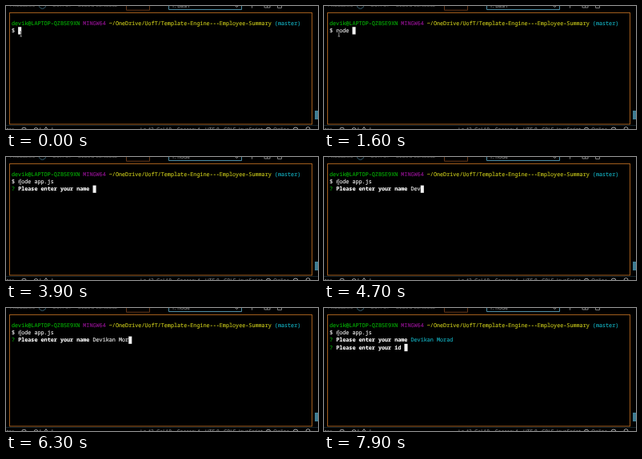
Recreate the animation shown at these times as an HTML page. Size 390 by 154 pixels, loop 8000 ms.

```html
<!DOCTYPE html>
<html lang="en">
<head>
<meta charset="utf-8">
<title>Terminal session</title>
<style>
html, body { margin: 0; width: 100%; height: 100%; overflow: hidden; background: #000; }
svg { display: block; width: 390px; height: 154px; background: #000; }
text { white-space: pre; text-rendering: geometricPrecision; }
.term { font: 6.77px "Noto Sans Mono", "DejaVu Sans Mono", monospace; color: #f0f0f0; }
.term text, .term tspan { fill: currentColor; stroke: currentColor; stroke-width: .14; }
.ui { font: 6.6px "Open Sans", "Noto Sans", sans-serif; fill: #a8a8a8; }
.line { fill: none; stroke-width: 1; }
.green { color: #06ae06; }
.magenta { color: #8e128e; }
.yellow { color: #c4c41a; }
.cyan { color: #14aebe; }
.bold { font-weight: 700; color: #fff; }
#mouse { mix-blend-mode: difference; fill: none; stroke: #a8a8a8; stroke-width: .8; }
</style>
</head>
<body>
<svg viewBox="0 0 390 154">
  <!-- panel header, cut by the top edge -->
  <g class="ui">
    <text x="5" y="1.3" font-size="6" opacity=".65">PROBLEMS</text>
    <circle class="line" cx="45.5" cy="-1" r="4.3" stroke="#3a6474"/>
    <text x="58" y="1.3" font-size="6" opacity=".65">OUTPUT</text>
    <text x="90" y="1.3" font-size="6" opacity=".65">DEBUG CONSOLE</text>
    <path class="line" d="M150.5 0V5.2H179.5V0" stroke="#64381a"/>
    <path class="line" d="M203.5 0V4.5H294.5V0" stroke="#4f8da3"/>
    <text id="shell" x="207" y="2.4"></text>
    <path class="line" d="M286 -1l2.5 2.5l2.5 -2.5" stroke="#999"/>
    <path class="line" d="M307.5 0V2.6M323 0V2H330V0M326.5 0V2M339.5 0V2.4H344.5V0" stroke="#808080"/>
  </g>

  <rect class="line" x="4.5" y="8.5" width="378" height="139.5" stroke="#a15d1d"/>
  <rect x="386" y="131" width="4" height="11" fill="#3f7d93"/>

  <!-- status bar, cut by the bottom edge -->
  <path class="line" d="M0 149.5H390" stroke="#14232a"/>
  <g class="ui">
    <text x="1" y="157">ter</text>
    <circle class="line" cx="22.5" cy="155" r="2.8" stroke="#a8a8a8"/>
    <path class="line" d="M35 155a2.5 2.5 0 1 1 5 0M47 156l3 -4.5l3 4.5" stroke="#a8a8a8"/>
    <text x="41" y="157">1</text>
    <text x="56" y="157">1</text>
    <text x="168" y="157">Ln 42, Col 18</text>
    <text x="214" y="157">Spaces: 4</text>
    <text x="249" y="157">UTF-8</text>
    <text x="272" y="157">CRLF</text>
    <text x="291" y="157">JavaScript</text>
    <circle class="line" cx="328" cy="155" r="2.8" stroke="#a8a8a8"/>
    <text x="334" y="157">Online</text>
    <path class="line" d="M359 155a3 3 0 0 1 6 0M375 156v-2a2.5 2.5 0 0 1 5 0v2" stroke="#a8a8a8"/>
  </g>

  <g class="term">
    <text x="7" y="23.6"><tspan class="green">devik@LAPTOP-QZB5E9XN</tspan> <tspan class="magenta">MINGW64</tspan> <tspan class="yellow">~/OneDrive/UofT/Template-Engine---Employee-Summary</tspan> <tspan class="cyan">(master)</tspan></text>
    <text x="7" y="33">$ <tspan id="command"></tspan></text>
    <text id="askName" x="7" y="42.3"><tspan class="green">?</tspan> <tspan class="bold">Please enter your name</tspan> <tspan id="answer"></tspan></text>
    <text id="askId" x="7" y="51.6"><tspan class="green">?</tspan> <tspan class="bold">Please enter your id</tspan></text>
  </g>
  <rect id="caret" width="4.1" height="9.3" fill="#f2f2f2"/>
  <path id="mouse" d="M-1.3 -3h2.6M0 -3V3M-1.3 3h2.6"/>
</svg>
<script>
const LOOP = 8000, LEFT = 7, CELL = 4.062, TOP = 16.9, ROW = 9.33;
const el = id => document.getElementById(id);
const [shell, command, askName, answer, askId, caret, mouse] =
  ["shell", "command", "askName", "answer", "askId", "caret", "mouse"].map(el);

// Each entry is the time at which the next character appears.
const commandKeys = [500, 600, 800, 900, 1500, 1700, 1900, 2000, 2100, 2600, 2700];
const nameKeys = [4300, 4500, 4600, 4900, 5000, 5100, 5300, 5500, 5800, 6100, 6300, 6600, 6800];
const ENTER = 3100, NAME_ASKED = 3400, NAME_DONE = 7300, ID_ASKED = 7400;

const typed = (text, keys, t) => text.slice(0, keys.filter(k => k <= t).length);
const show = (node, on) => node.setAttribute("visibility", on ? "visible" : "hidden");

function caretCell(t, commandText, nameText) {
  if (t < ENTER) return [2 + commandText.length, 1];
  if (t < NAME_ASKED) return [0, 2];
  if (t < NAME_DONE) return [25 + nameText.length, 2];
  return t < ID_ASKED ? [0, 3] : [23, 3];
}

function draw(t) {
  const commandText = typed("node app.js", commandKeys, t);
  const nameText = typed("Devikan Morad", nameKeys, t);
  command.textContent = commandText;
  answer.textContent = nameText;
  answer.setAttribute("class", t < NAME_DONE ? "" : "cyan");
  shell.textContent = t < NAME_ASKED ? "1: bash" : "1: node";
  show(askName, t >= NAME_ASKED);
  show(askId, t >= ID_ASKED);

  const [col, row] = caretCell(t, commandText, nameText);
  caret.setAttribute("x", LEFT + col * CELL);
  caret.setAttribute("y", TOP + row * ROW);

  const rise = Math.min(1, Math.max(0, (t - 3300) / 300));
  mouse.setAttribute("transform", `translate(${18.7 - rise * .7} ${35 - rise * 3.8})`);
}

function tick() {
  draw(performance.now() % LOOP);
  requestAnimationFrame(tick);
}
tick();
</script>
</body>
</html>
```
